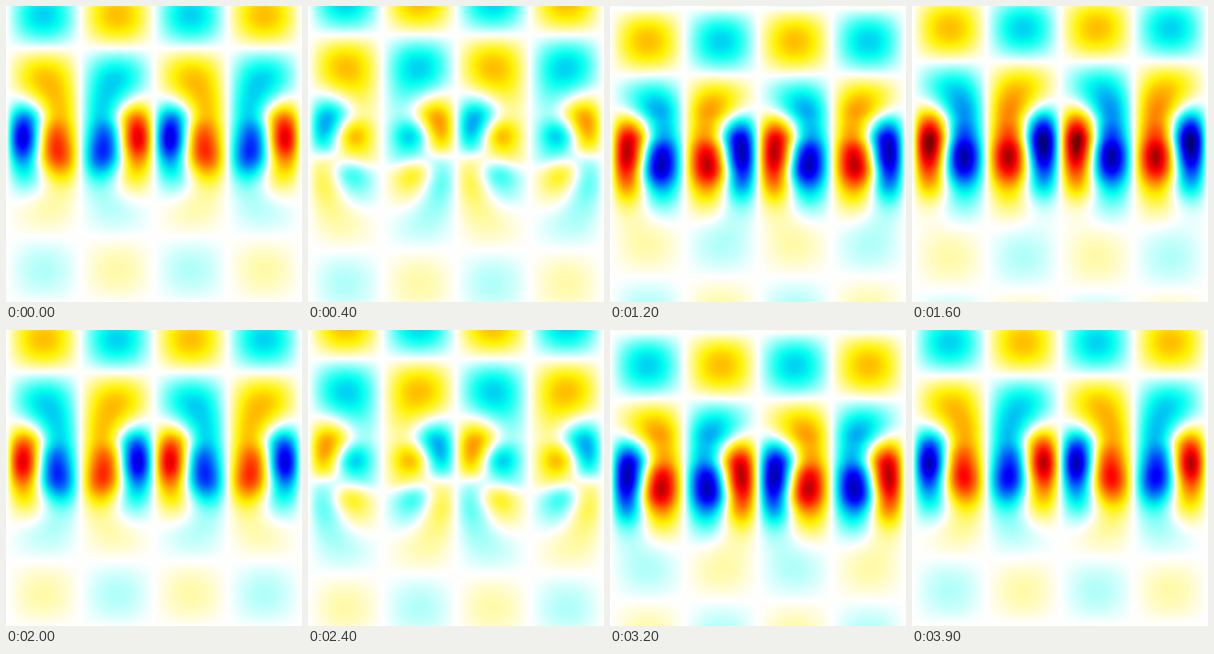
Recreate the animation shown at these times as a matplotlib script. Size 400 by 400 pixels, loop 4 s.

```python
import numpy as np
import matplotlib.pyplot as plt
from matplotlib.animation import FuncAnimation
from matplotlib.colors import LinearSegmentedColormap

SIZE, FRAMES, INTERVAL = 400, 40, 100
CELL = 99.5               # width of one waveguide
K = 2 * np.pi / 180       # axial wavenumber of the guided mode

pixels = np.arange(SIZE) + 0.5


def bump(center, width):
    return np.exp(-((pixels - center) / width) ** 2 / 2)


def fade_in(center, width):
    return 1 / (1 + np.exp(-(pixels - center) / width))


def profile(n):
    """Transverse shape of mode n across all cells."""
    return np.sin(n * np.pi * (pixels - 1) / CELL)


# The lowest mode leaves the driven zone upwards and, weaker, downwards.
upward = 0.36j * np.exp(-1j * K * (pixels - 57)) * (1 - fade_in(153, 6))
downward = 0.085j * np.exp(1j * K * (pixels - 312)) * fade_in(255, 10)
driven = (0.16 * bump(205, 15) + 0.15j * bump(178, 9)
          - 0.22j * bump(224, 14))

# Higher modes cannot travel and stay bound to the driven zone.
modes = [
    upward + downward + driven,
    -0.70 * bump(183, 34) + 0.71j * bump(211, 34),
    -0.18 * bump(178, 22) + 0.16j * bump(217, 26),
]
amplitude = sum(np.outer(mode, profile(n)) for n, mode in enumerate(modes, 1))


def field_at(frame):
    phase = 2 * np.pi * frame / FRAMES
    return (amplitude * np.exp(-1j * phase)).real


cmap = LinearSegmentedColormap.from_list("wave", [
    (0, (0, 0, .5)), (.125, (0, 0, 1)), (.36, (0, 1, .94)), (.5, (1, 1, 1)),
    (.625, (1, .95, 0)), (.885, (1, 0, 0)), (1, (.5, 0, 0))], N=512)

fig = plt.figure(figsize=(4, 4), dpi=100)
ax = fig.add_axes([0, 0, 1, 1])
ax.axis("off")
image = ax.imshow(field_at(0), cmap=cmap, vmin=-1, vmax=1,
                  interpolation="nearest", aspect="auto")


def update(frame):
    image.set_data(field_at(frame))
    return [image]


anim = FuncAnimation(fig, update, frames=FRAMES, interval=INTERVAL,
                     repeat=True, repeat_delay=0)
plt.show()
```
